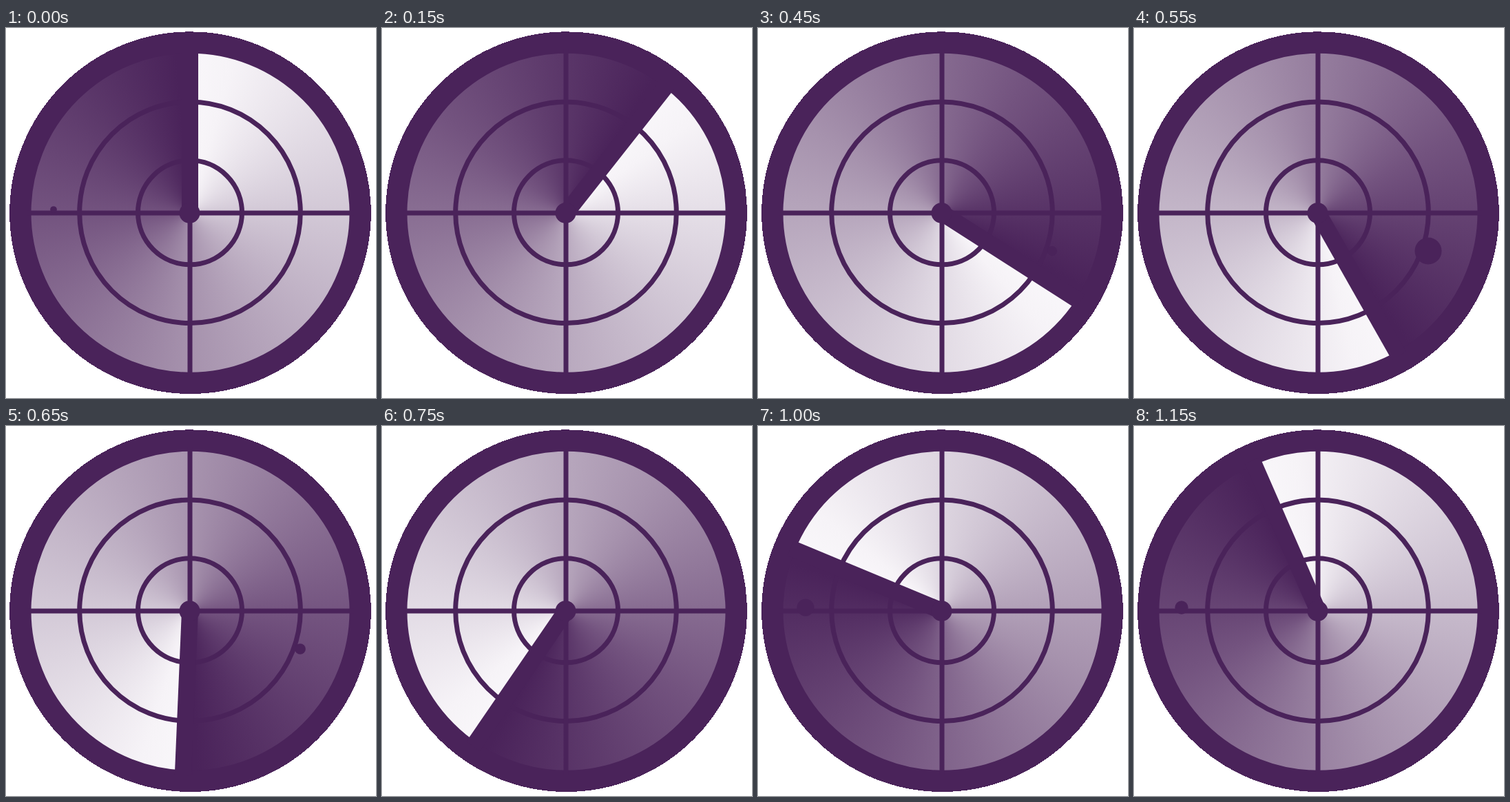
Recreate the animation shown at these times as an HTML page. Size 537 by 536 pixels, loop 1200 ms.

```html
<!DOCTYPE html>
<html lang="en">
<head>
<meta charset="utf-8">
<title>Radar sweep</title>
<style>
  html, body { margin: 0; width: 100%; height: 100%; overflow: hidden; background: #fff; }
  #glow {
    --sweep: 0deg;
    position: absolute; left: 33px; top: 34px; width: 468px; height: 468px; border-radius: 50%;
    background: conic-gradient(from var(--sweep), #f9f7fa 0deg, #f6f3f7 16deg, #d2c8d6 90deg,
      #a692ad 180deg, #73537f 270deg, #4a235a 355deg);
  }
  svg { position: absolute; left: 0; top: 0; width: 100%; height: 100%; display: block; }
</style>
</head>
<body>
<div id="glow"></div>
<svg viewBox="0 0 537 536" preserveAspectRatio="xMinYMin">
  <g fill="none" stroke="#4a235a" stroke-width="7">
    <circle cx="267.5" cy="267.7" r="246" stroke-width="30"/>
    <circle cx="267.5" cy="267.7" r="257.3" stroke-width="10" shape-rendering="crispEdges"/>
    <circle cx="267" cy="267.3" r="160.3"/>
    <circle cx="267" cy="267.3" r="75.5"/>
    <path d="M30 268H505M267 30V505"/>
  </g>
  <g fill="#4a235a">
    <circle id="dotA" cx="427" cy="323"/>
    <circle id="dotB" cx="69" cy="263"/>
    <rect id="arm" x="255" y="30" width="24" height="238"/>
    <circle cx="266.5" cy="268" r="15"/>
  </g>
</svg>
<script>
const LOOP = 1200, STEP = 50;
// Sweep poses: [step, degrees]
const POSES = [[0, 0], [3, 38.3], [7, 94.7], [11, 150.4], [15, 214.5], [18, 263.3], [23, 336.4], [24, 360]];
const el = id => document.getElementById(id);
const glow = el('glow'), arm = el('arm');
const dots = [{ node: el('dotA'), hit: 111 }, { node: el('dotB'), hit: 272 }];

function sweepAngle(step) {
  const i = POSES.findIndex(([s]) => s > step);
  const [s0, a0] = POSES[i - 1], [s1, a1] = POSES[i];
  return a0 + (a1 - a0) * (step - s0) / (s1 - s0);
}

// A dot swells once the sweep has passed it, then decays.
function dotRadius(past) {
  if (past > 96) return 0;
  return past < 40 ? 19.5 * Math.min(1, past / 32) : 19.5 * 2 ** ((40 - past) / 24);
}

function draw(time) {
  const angle = sweepAngle(Math.floor((time % LOOP) / STEP));
  glow.style.setProperty('--sweep', `${angle}deg`);
  arm.setAttribute('transform', `rotate(${angle} 267 268)`);
  for (const { node, hit } of dots) {
    node.setAttribute('r', dotRadius((angle - hit + 360) % 360));
  }
}

const start = performance.now();
function loop() {
  draw(performance.now() - start);
  requestAnimationFrame(loop);
}
loop();
</script>
</body>
</html>
```
